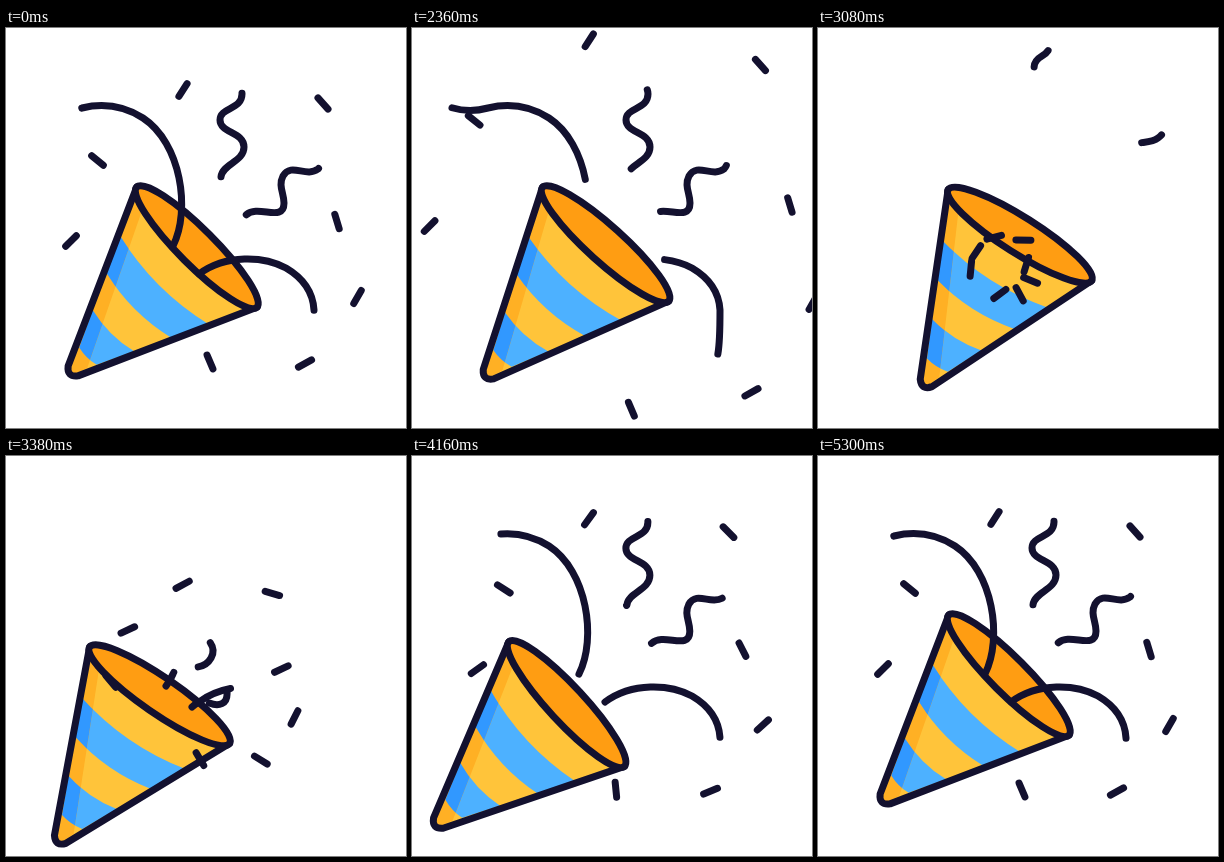
Recreate the animation shown at these times as an HTML page. Size 400 px wide and 400 px high, loop 5.33 s.

```html
<!DOCTYPE html>
<html lang="en">
<head>
<meta charset="utf-8">
<title>Party popper</title>
<style>
  html, body { margin: 0; width: 100%; height: 100%; overflow: hidden; background: #fff; }
  svg { display: block; width: 100%; height: 100%; }
  .ink { stroke: #13112f; stroke-width: 7; stroke-linecap: round; stroke-linejoin: round; }
</style>
</head>
<body>
<svg viewBox="0 0 400 400">
  <defs>
    <clipPath id="side"><path d="M0-88L-10-66L-163 8L-184 0Z"/></clipPath>
    <path id="body" d="M0-85L-175-7Q-184 0-175 7L0 85Z"/>
    <path id="bands"/>
  </defs>
  <g id="cone">
    <use href="#body" fill="#ffc43a"/>
    <use href="#bands" fill="#4db1ff"/>
    <g clip-path="url(#side)">
      <use href="#body" fill="#ffb024"/>
      <use href="#bands" fill="#3198ff"/>
    </g>
    <use href="#body" class="ink" fill="none"/>
    <ellipse class="ink" rx="18" ry="85" fill="#ff9d12"/>
  </g>
  <g id="paper" class="ink" fill="none"></g>
</svg>
<script>
const LOOP = 5330, START = 2030, FIRE = 3080, RECOILED = 3740;
const $ = id => document.getElementById(id);
const mix = (a, b, u) => a + (b - a) * u;
const progress = (t, start, duration) => Math.min(1, Math.max(0, (t - start) / duration));
const smooth = u => u * u * (3 - 2 * u);
const easeOut = (u, power) => 1 - (1 - u) ** power;

function addPath(d) {
  const el = document.createElementNS('http://www.w3.org/2000/svg', 'path');
  el.setAttribute('d', d);
  $('paper').append(el);
  return el;
}

// Cone: axis along x, mouth at 0, tip at -180
function band(from, to) {
  const half = x => 85 * (180 + x) / 180;
  const a = half(from), b = half(to);
  return `M${from} ${-a}Q${from - a * .24} 0 ${from} ${a}L${to} ${b}Q${to - b * .24} 0 ${to} ${-b}Z`;
}
$('bands').setAttribute('d', band(-46, -82) + band(-118, -154));

const rest = { x: 159, y: 251, turn: -45 };
const wound = { x: 178, y: 245, turn: -57.6 };
const recoil = { x: 107, y: 289.5, turn: -42 };

function drawCone(t) {
  let from = rest, to = wound, move = smooth(progress(t, START, FIRE - START)), spin = move;
  if (t > RECOILED) {
    [from, to] = [recoil, rest];
    move = spin = smooth(easeOut(progress(t, RECOILED, LOOP - RECOILED), 1.4));
  } else if (t > FIRE) {
    const u = progress(t, FIRE, RECOILED - FIRE);
    [from, to] = [wound, recoil];
    move = easeOut(u, 2);
    spin = u ** 2.5;
  }
  $('cone').setAttribute('transform', `translate(${mix(from.x, to.x, move)} ${mix(from.y, to.y, move)})
    rotate(${mix(from.turn, to.turn, spin)}) translate(45 0)`);
}

// Streamers slide along a path of three parts: run-up, resting shape, way out.
const glide = u => smooth(u), lag = u => smooth(u) ** 1.15, speedUp = u => u ** 2.4;
const streamers = [
  {
    parts: ['M160 230Q164 225 167 218', 'C185 182 175 115 137 90C118 78 97 75 76 80',
      'C46 88 4 76 14 32C18 15 12 0-14-10'],
    tail: lag, head: glide, start: 3348, grow: 1340
  },
  {
    parts: ['M186 251Q189 248 193 246', 'C220 226 258 228 280 240C297 250 307 264 308 282',
      'C308 310 308 326 301 342C292 362 274 369 253 364C225 356 222 385 222 410'],
    tail: lag, head: glide, start: 3266, grow: 1100
  },
  {
    parts: ['M203 186C215 184 224 170 213 159C209 154 210 152 215 149',
      'C216 136 238 134 238 119C238 104 214 105 214 92C214 79 236 82 236 66',
      'C236 60 232 56 227 53C212 44 214 34 224 28C234 22 232 16 228 11'],
    tail: speedUp, head: speedUp, start: 3320, grow: 850, drift: [-11, 25]
  },
  {
    parts: ['M222 228C232 232 240 229 240 219C240 212 240 208 239 203C236 192 234 190 240 187',
      'C252 176 278 195 278 175C278 165 272 158 277 148C285 134 300 150 312 141',
      'C316 137 316 131 314 125C310 110 330 118 340 110Q348 104 348 96'],
    tail: speedUp, head: speedUp, start: 3320, grow: 1120, drift: [-19, 19]
  }
];
for (const s of streamers) {
  s.el = addPath('');
  let d = '';
  s.marks = s.parts.map(part => {
    s.el.setAttribute('d', d += part);
    return s.el.getTotalLength();
  });
}

function drawStreamer({ el, marks, tail, head, start, grow, drift = [0, 0] }, t) {
  const [first, last, exit] = marks;
  let from, to, away = 0;
  if (t < start) {
    const u = progress(t, START, head === glide ? 1050 : 1150);
    from = mix(first, exit, tail(u));
    to = mix(last, exit, head(u));
  } else {
    from = first * easeOut(progress(t, 3380, 1000), 3);
    to = last * easeOut(progress(t, start, grow), 3);
    away = (1 - progress(t, 3380, 1000)) ** 3;
  }
  el.setAttribute('visibility', to - from > 1 ? 'visible' : 'hidden');
  el.setAttribute('stroke-dasharray', `${Math.max(0, to - from)} 9999`);
  el.setAttribute('stroke-dashoffset', -from);
  el.setAttribute('transform', `translate(${drift[0] * away} ${drift[1] * away})`);
}

// Confetti flies straight out of the mouth. Resting x, y, angle, and spin in flight
const mouth = { x: 176, y: 248 };
const confetti = [
  [177, 62, -57, 48], [317, 75.5, 48, -53], [91.5, 132.5, 39, -107], [65, 213, -45, 158],
  [331, 193.5, 73, -164], [351.5, 269, -60, 295], [299, 335.5, -29, 102], [204, 334, 67, 288]
].map(([x, y, angle, spin]) => ({ x, y, angle, spin, el: addPath('M-7.5 0H7.5') }));

function drawConfetti({ x, y, angle, spin, el }, t) {
  const dx = x - mouth.x, dy = y - mouth.y, reach = Math.hypot(dx, dy);
  let flight = 1 + 180 / reach * ((Math.max(t, START) - START) / 630) ** 2;
  if (t > FIRE) {
    const u = progress(t, 2976, 1400);
    flight = easeOut(u, 3);
    angle += spin * (1 - u) ** 1.5;
  }
  el.setAttribute('transform',
    `translate(${mouth.x + dx * flight} ${mouth.y + dy * flight}) rotate(${angle})`);
}

function draw() {
  const t = performance.now() % LOOP;
  drawCone(t);
  streamers.forEach(s => drawStreamer(s, t));
  confetti.forEach(c => drawConfetti(c, t));
  requestAnimationFrame(draw);
}
draw();
</script>
</body>
</html>
```
